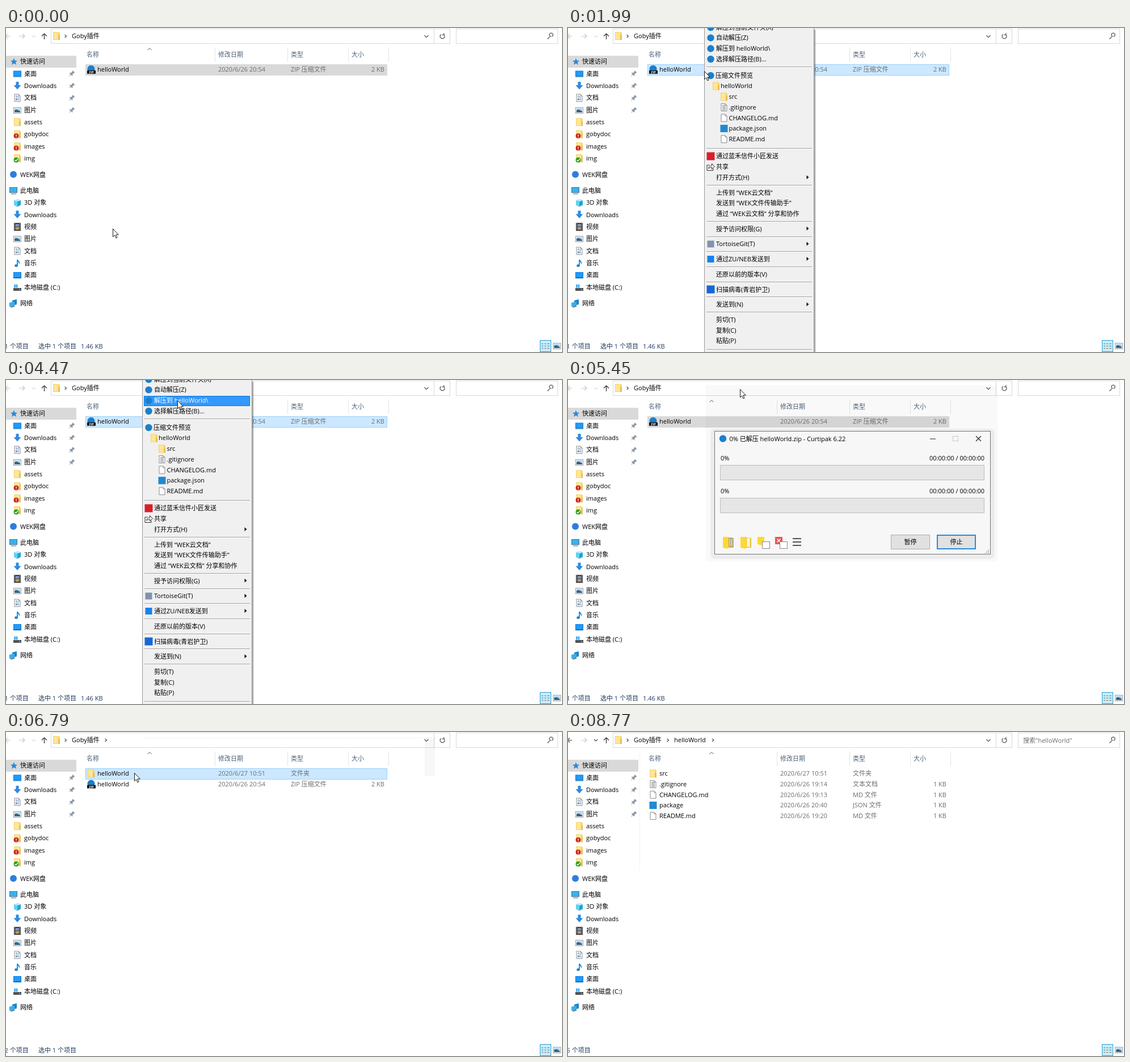
An HTML page for the animation above (9.32 s loop, 980 by 572 pixels).

```html
<!DOCTYPE html>
<html lang="zh-CN">
<head>
<meta charset="utf-8">
<title>helloWorld</title>
<style>
html, body { margin: 0; width: 100%; height: 100%; overflow: hidden; background: #fff; }
svg { display: block; width: 980px; height: 572px; }
text { font: 11px "Open Sans", "Noto Sans CJK SC", "Noto Sans CJK", sans-serif; fill: #000; white-space: pre; }
.dim { fill: #6d6d6d; }
.head { fill: #4c607a; }
.stat { fill: #1e395b; }
.end { text-anchor: end; }
.mid { text-anchor: middle; }
.white text { fill: #fff; }
text.zip { font-size: 5.5px; font-weight: 700; fill: #fff; text-anchor: middle; }
</style>
</head>
<body>
<svg id="stage" viewBox="0 0 980 572"></svg>
<script>
const LOOP = 9320;

// markup helpers
const text = (x, cy, s, cls = '') => `<text x="${x}" y="${Math.round(cy + 4)}" class="${cls}">${s}</text>`;
const rect = (x, y, w, h, fill, more = '') => `<rect x="${x}" y="${y}" width="${w}" height="${h}" fill="${fill}" ${more}/>`;
const box = (x, y, w, h, fill, stroke) => rect(x + .5, y + .5, w - 1, h - 1, fill, `stroke="${stroke}"`);
const line = (d, color, w = 1, more = '') => `<path d="${d}" fill="none" stroke="${color}" stroke-width="${w}" ${more}/>`;
const fill = (d, color) => `<path d="${d}" fill="${color}"/>`;
const disc = (x, y, r, color) => `<circle cx="${x}" cy="${y}" r="${r}" fill="${color}"/>`;
const put = (name, x, y) => `<g transform="translate(${x} ${y})">${icons[name]}</g>`;
// visible from a until b
const during = (a, b, ...parts) => `<g data-from="${a}" data-to="${b}">${parts.join('')}</g>`;

// icons are centred on 0,0
const folder = fill('M-6-7H4L6-5V7H-6Z', '#f6d06f') + fill('M-5-6H3V6H-5Z', '#ffe596') + fill('M3-1H6V7H3Z', '#eebd4d');
const page = fill('M-5-7H2L5-4V7H-5Z', '#fff') + line('M-5-6.5H2L5-3.5V6.5H-5Z M2-6.5V-3.5H5', '#8a8a8a');
const screen = rect(-7, -5, 14, 10, '#0b7bd0') + rect(-6, -4, 12, 8, '#1e9bff');
const icons = {
  folder, page,
  bad: folder + disc(-2, 3, 4.5, '#c5281c') + line('M-2 .5V3.5M-2 4.5V6', '#fff', 1.3),
  good: folder + disc(-2, 3, 4.5, '#259b24') + line('M-4.5 3L-2.5 5L1 1', '#fff', 1.3),
  txt: page + line('M-3-3.5H2M-3-1.5H3M-3 .5H3M-3 2.5H3M-3 4.5H3', '#8a8a8a'),
  doc: page + line('M-3-3.5H0M-3-1.5H3M0 1.5H3M0 3.5H3', '#5b86ad') + rect(-3, 1, 2.5, 3, '#4b83b8'),
  desk: screen + rect(-7, 5, 14, 1, '#0663a9'),
  pc: rect(-7, -6, 14, 10, '#5a6b78') + rect(-6, -5, 12, 8, '#35b4f0') + rect(-4, 5, 9, 1.5, '#7494a8'),
  down: fill('M-2.5-7H2.5V-1H6.5L0 6.5L-6.5-1H-2.5Z', '#2c8be0'),
  pic: box(-7, -5, 14, 11, '#fff', '#8f9aa3') + rect(-5, -3, 10, 7, '#a6d3ee') + fill('M-5 4V0L-1-1L5 2V4Z', '#33607f'),
  cube: fill('M-6-4L1-6L6-4V4L0 7L-6 4Z', '#19a7dc') + fill('M-6-4L0-2V7L-6 4Z', '#66d1f0') + fill('M-6-4L1-6L6-4L0-2Z', '#b0eafa'),
  film: rect(-6, -7, 12, 14, '#3c3c46') + rect(-3, -5, 6, 4.5, '#7f95c6') + rect(-3, .5, 6, 4.5, '#c49b55') +
    line('M-4.5-6V6M4.5-6V6', '#ddd', 1, 'stroke-dasharray="1.5 1.5"'),
  note: line('M0 4V-6C1-3 4-3 3.5 1', '#1284d8', 1.8) + `<ellipse cx="-2" cy="4.5" rx="2.8" ry="2.3" fill="#1284d8"/>`,
  disk: rect(-7, 1, 14, 5, '#4c5359') + rect(3, 3, 2, 1.5, '#6ee08a') + rect(-6, -5, 6.5, 5.1, '#1d9be8') + line('M-2.75-5V0M-6-2.5H.5', '#fff', .6),
  net: fill('M-2-5L6-7V2L-2 4Z', '#1e82c9') + fill('M-7-1L2-3V5L-7 6Z', '#38aeea') + line('M-5 7L2 5', '#4b6c85', 1.5),
  star: fill('M0-6L1.8-2L6-1.8L2.8 1L4 5.5L0 3L-4 5.5L-2.8 1L-6-1.8L-1.8-2Z', '#2b88d8'),
  pin: `<g transform="rotate(45)">${fill('M-2.5-5H2.5V-4L1.7-3V0L3.5 1.5V2.5H-3.5V1.5L-1.7 0V-3L-2.5-4Z', '#8796a5')}${line('M0 2V6', '#8796a5')}</g>`,
  cloud: disc(0, 0, 6, '#2f7de1'),
  tool: disc(0, 0, 6.2, '#1b7fcb'),
  zip: disc(0, -1, 6.5, '#1b7fcb') + rect(-7, 1.5, 15, 6, '#111') + `<text x=".5" y="6.5" class="zip">ZIP</text>`,
  code: rect(-6.5, -6.5, 13, 13, '#1f8ad2'),
  mail: rect(-7, -7, 14, 14, '#d81e2c'),
  chat: rect(-6, -6, 12, 12, '#1583ea'),
  guard: rect(-7, -7, 14, 14, '#1766d8'),
  git: rect(-6, -6, 12, 12, '#8093ad'),
  share: line('M-2-3H-6.5V6.5H4.5V3', '#333') + line('M-4 3C-3-1-1-2 2-2V-5.5L7-.5L2 4V1C-1 1-3 2-4 3Z', '#333'),
  sort: line('M-3.5 2L0-1.5L3.5 2', '#555'),
  more: line('M-1.5-2.5L1.5 0L-1.5 2.5', '#444', 1.1),
  drop: line('M-3.5-1.5L0 2L3.5-1.5', '#555', 1.2)
};

// window frame, address bar, navigation
const backArrow = c => line('M-1 14.5H7M3 10.5L-1 14.5L3 18.5', c, 1.2);
const chrome = [
  during(0, 7060, backArrow('#c4c4c4'), line('M46.5 13.5L49 16L51.5 13.5', '#c4c4c4')),
  during(7060, LOOP, backArrow('#444'), line('M46 13L49 16L52 13', '#444', 1.2)),
  line('M23 14.5H33M29 10.5L33 14.5L29 18.5', '#c8c8c8', 1.2),
  line('M67.5 20V10M63 14.5L67.5 10L72 14.5', '#444', 1.4),
  box(79, 1, 704, 27, '#fff', '#d9d9d9'), line('M754.5 1V28', '#d9d9d9'),
  box(793, 1, 180, 27, '#fff', '#d9d9d9'),
  put('folder', 89, 14), put('more', 105, 14.5), put('drop', 741, 14.5),
  line('M771.5 11.5A4 4 0 1 1 767 11.3M771.8 9V12.2H768.5', '#555', 1.3),
  line('M960.5 15.2A3.2 3.2 0 1 1 961.5 15.2M958.5 15.5L954.5 19.5', '#555', 1.3)
].join('');

const crumbHover = (x, w) => box(x, 2, w, 26, '#e5f3ff', '#cce8ff');
const crumbs = [
  during(8120, 8380, crumbHover(184, 79)),
  during(8380, 8530, crumbHover(113, 72)),
  text(116, 14, 'Goby插件'),
  during(5830, LOOP, put('more', 176, 14.5)),
  during(7060, LOOP, text(187, 14, 'helloWorld'), text(802, 14.5, '搜索"helloWorld"', 'dim')),
  during(7340, LOOP, put('more', 255.5, 14.5))
].join('');

const side = [
  [1, 80.5, 'desk', '桌面', 1], [1, 102, 'down', 'Downloads', 1], [1, 123.4, 'doc', '文档', 1], [1, 145, 'pic', '图片', 1],
  [1, 166, 'folder', 'assets'], [1, 187.4, 'bad', 'gobydoc'], [1, 209, 'bad', 'images'], [1, 230, 'good', 'img'],
  [0, 258.5, 'cloud', 'WEK网盘'], [0, 287, 'pc', '此电脑'], [1, 308.4, 'cube', '3D 对象'], [1, 329.5, 'down', 'Downloads'],
  [1, 351, 'film', '视频'], [1, 372, 'pic', '图片'], [1, 393.5, 'doc', '文档'], [1, 415, 'note', '音乐'],
  [1, 436, 'desk', '桌面'], [1, 458, 'disk', '本地磁盘 (C:)'], [0, 486, 'net', '网络']
];
const sidebar = rect(0, 49, 124, 21, '#d9d9d9') + put('star', 14, 59.5) + text(25, 59, '快速访问') +
  side.map(([d, y, icon, name, pin]) => put(icon, d ? 20 : 13, y) + text(d ? 32 : 25, y, name) + (pin ? put('pin', 116, y) : '')).join('') +
  during(8650, LOOP, line('M126.5 35V245', '#f3f3f3'));

const headHover = rect(127, 35, 242, 25, '#d9ebf9') + line('M355.5 35V60', '#b9d7ee') +
  line('M358.5 45L361.5 48L364.5 45', '#555');
const columns = [
  during(590, 730, headHover), during(5980, 6100, headHover),
  put('sort', 253, 37),
  text(142, 46.5, '名称', 'head'), text(374, 46.5, '修改日期', 'head'),
  text(502, 46.5, '类型', 'head'), text(609, 46.5, '大小', 'head'),
  line('M368.5 34V60M496.5 34V60M603.5 34V60M674.5 34V60', '#e5e5e5')
].join('');

// file list
const rowY = i => 73.3 + i * 18.7;
const file = (i, icon, name, date, type, size = '') => put(icon, 150, rowY(i)) + text(161, rowY(i), name) +
  text(374, rowY(i), date, 'dim') + text(502, rowY(i), type, 'dim') + text(667, rowY(i), size, 'dim end');
const band = (i, color, edge = color) => box(140, i ? 83 : 64, 532, i ? 19 : 20, color, edge);
const grey = i => band(i, '#d9d9d9'), blue = i => band(i, '#cce8ff', '#99d1ff'), hover = i => band(i, '#e5f3ff');
const archive = i => file(i, 'zip', 'helloWorld', '2020/6/26 20:54', 'ZIP 压缩文件', '2 KB');
const list = [
  during(0, 730, grey(0)), during(730, 5200, blue(0)), during(5200, 5830, grey(0)),
  during(0, 5830, archive(0)),
  during(5830, 5980, grey(1)), during(5980, 6790, blue(1)),
  during(6100, 6250, hover(0)), during(6790, 7060, blue(0)),
  during(5830, 7060, file(0, 'folder', 'helloWorld', '2020/6/27 10:51', '文件夹'), archive(1)),
  during(7060, 7490, hover(0)), during(8530, 8650, hover(1)),
  during(7060, LOOP,
    file(0, 'folder', 'src', '2020/6/27 10:51', '文件夹'),
    file(1, 'txt', '.gitignore', '2020/6/26 19:14', '文本文档', '1 KB'),
    file(2, 'page', 'CHANGELOG.md', '2020/6/26 19:13', 'MD 文件', '1 KB'),
    file(3, 'code', 'package', '2020/6/26 20:40', 'JSON 文件', '1 KB'),
    file(4, 'page', 'README.md', '2020/6/26 19:20', 'MD 文件', '1 KB'))
].join('');

const count = n => text(-2.5, 562, n + ' 个项目', 'stat');
const status = [
  during(0, 5830, count(1)), during(5830, 7060, count(2)), during(7060, LOOP, count(5)),
  during(0, 7060, text(57, 562, '选中 1 个项目', 'stat')),
  during(0, 6790, text(132, 562, '1.46 KB', 'stat')),
  box(941, 551, 20, 21, '#cbeaf6', '#26a0da'),
  line('M944 557.5H947M944 561.5H947M944 565.5H947M949 557.5H952M949 561.5H952M949 565.5H952M954 557.5H958M954 561.5H958M954 565.5H958', '#5d7d8c'),
  put('pic', 971, 561)
].join('');

// context menu
const item = (y, s, icon, arrow) => text(261, y, s) + (icon ? put(icon, 251.5, y) : '') +
  (arrow ? fill(`M420.5 ${y - 4}L424.5 ${y - .5}L420.5 ${y + 3}Z`, '#111') : '');
const autoItem = item(17.4, '自动解压(Z)', 'tool');
const hereItem = item(36.3, '解压到 helloWorld\\', 'tool');
const preview = put('tool', 251.5, 84) + text(260, 84, '压缩文件预览') +
  put('folder', 261, 102.5) + text(269, 102.4, 'helloWorld') +
  [['folder', 'src'], ['txt', '.gitignore'], ['page', 'CHANGELOG.md'], ['code', 'package.json'], ['page', 'README.md']]
    .map(([icon, s], i) => put(icon, 275, 121.3 + i * 18.7) + text(283.5, 121.3 + i * 18.7, s)).join('');
const lit = (y, h, body) => `<g class="white">${box(243, y, 187, h, '#3399ff', '#0078d7')}${body}</g>`;
const rule = y => line(`M244 ${y + .5}H430`, '#a0a0a0') + line(`M244 ${y + 1.5}H430`, '#fff');
const menu = [
  '<linearGradient id="shade"><stop stop-opacity=".42"/><stop offset="1" stop-opacity=".08"/></linearGradient>',
  rect(434, 3, 3, 569, 'url(#shade)'),
  box(240, -2, 194, 576, '#f0f0f0', '#979797'),
  [68, 212, 277, 341, 368, 394, 421, 448, 474, 501, 567].map(rule).join(''),
  item(-1, '解压到当前文件夹(X)', 'tool'), autoItem, hereItem, item(55, '选择解压路径(B)...', 'tool'), preview,
  item(226.4, '通过蓝禾信件小匠发送', 'mail'), item(245, '共享', 'share'), item(264, '打开方式(H)', '', 1),
  item(290.5, '上传到 “WEK云文档”'), item(309.3, '发送到 “WEK文件传输助手”'), item(328, '通过 “WEK云文档” 分享和协作'),
  item(354.5, '授予访问权限(G)', '', 1), item(381.4, 'TortoiseGit(T)', 'git', 1), item(408, '通过ZU/NEB发送到', 'chat', 1),
  item(435, '还原以前的版本(V)'), item(461.5, '扫描病毒(青岩护卫)', 'guard'), item(488.3, '发送到(N)', '', 1),
  item(515, '剪切(T)'), item(533.5, '复制(C)'), item(552, '粘贴(P)'),
  during(2670, 4470, lit(74, 136, preview)),
  during(4470, 4770, lit(28, 18, hereItem)),
  during(4770, 5200, lit(9, 18, autoItem))
].join('');

// progress dialog
const bar = y => text(269, y - 12.5, '0%') + text(734, y - 12.5, '00:00:00 / 00:00:00', 'end') + box(268, y, 466, 27, '#e6e6e6', '#bcbcbc');
const bigFolder = x => fill(`M${x} 277H${x + 11}V296L${x + 8} 298L${x} 296Z`, '#fdd835') + fill(`M${x + 11} 279H${x + 19}V296H${x + 11}Z`, '#f0c02c');
const dialog = [
  rect(243, 9, 514, 311, '#000', 'opacity=".025"'), rect(251, 86, 501, 230, '#000', 'rx="8" opacity=".05"'),
  box(258, 90, 487, 218, '#f7f7f7', '#747474'),
  disc(273, 103.5, 6.2, '#1b7fcb'), text(284.5, 103.5, '0% 已解压 helloWorld.zip - Curtipak 6.22'),
  line('M638 104H648M719 99L728 108M728 99L719 108', '#222', 1.1), box(678, 99, 10, 9, 'none', '#c8c8c8'),
  bar(150), bar(208),
  bigFolder(273), rect(284, 279, 6, 15, '#f4f4f4', 'stroke="#777"'), line('M287 280V293', '#666', 2, 'stroke-dasharray="1.5 1"'),
  bigFolder(304), rect(315, 279, 6, 16, '#fff', 'stroke="#e8c23c"'),
  fill('M334 277H346V290L342 292L334 290Z', '#fdd835'), box(342, 285, 14, 13, '#fff', '#888'),
  rect(365, 277, 13, 13, '#e05a5a'), line('M368.5 280.5L374.5 286.5M374.5 280.5L368.5 286.5', '#fff', 1.5), box(373, 285, 14, 13, '#fff', '#888'),
  line('M396 280H411M396 286H411M396 292H411', '#555', 2),
  box(569, 273, 69, 26, '#e1e1e1', '#adadad'), text(603.5, 286, '暂停', 'mid'),
  rect(651, 274, 67, 24, '#e1e1e1', 'stroke="#2a8bdc" stroke-width="2"'), text(684.5, 286, '停止', 'mid'),
  line('M741 299V306M738 302V306M735 305V306', '#bbb', 1.6)
].join('');
const leftover = rect(738, 9, 18, 69, '#000', 'opacity=".03"') + line('M243 10.5H738', '#f2f2f2');

const stage = document.getElementById('stage');
stage.innerHTML = chrome + crumbs + sidebar + columns + list + status +
  `<g id="menu">${menu}</g><g id="dialog">${dialog}</g>` + during(5830, 7060, leftover) +
  `<path id="cursor" d="M.5.5V14.7L3.7 11.7L5.8 16.8L8 15.9L5.9 10.9H10.3Z" fill="#fff" stroke="#000" stroke-width=".9"/>`;

// time, x, y
const path = [
  [0, 188, 354], [310, 236, 220], [440, 283, 86], [590, 272, 56], [730, 261, 74], [890, 246, 76], [1290, 243, 76], [1410, 240, 76],
  [2670, 252, 78], [2790, 264, 81], [2910, 273, 84], [3060, 283, 84], [4470, 302, 36], [4620, 302, 32], [4770, 303, 16],
  [5830, 322, 36], [5980, 330, 52], [6100, 318, 80], [6250, 304, 112], [6370, 288, 136], [6490, 268, 146], [6640, 240, 100],
  [6790, 226, 72], [7490, 232, 190], [7610, 238, 306], [7730, 236, 250], [7860, 230, 190], [8000, 222, 162], [8120, 208, 12],
  [8240, 190, 14], [8380, 165, 16], [8530, 152, 92], [8650, 134, 226], [8770, -40, 226]
];
// time, opacity
const menuFade = [[0, 0], [1710, .45], [1840, .88], [1990, 1], [5200, 0]];
const dialogFade = [[0, 0], [5320, .5], [5450, 1], [5710, .4], [5830, 0]];

const last = (steps, t) => steps.filter(s => s[0] <= t).pop();
const timed = [...stage.querySelectorAll('[data-from]')].map(el => ({ el, from: +el.dataset.from, to: +el.dataset.to }));
const [menuEl, dialogEl, cursorEl] = ['menu', 'dialog', 'cursor'].map(id => document.getElementById(id));
const start = performance.now();

function draw(now) {
  const t = Math.max(0, now - start) % LOOP;
  for (const { el, from, to } of timed) el.style.display = t >= from && t < to ? '' : 'none';
  menuEl.style.opacity = last(menuFade, t)[1];
  dialogEl.style.opacity = last(dialogFade, t)[1];
  const [, x, y] = last(path, t);
  cursorEl.setAttribute('transform', `translate(${x} ${y})`);
  requestAnimationFrame(draw);
}
draw(start);
</script>
</body>
</html>
```
